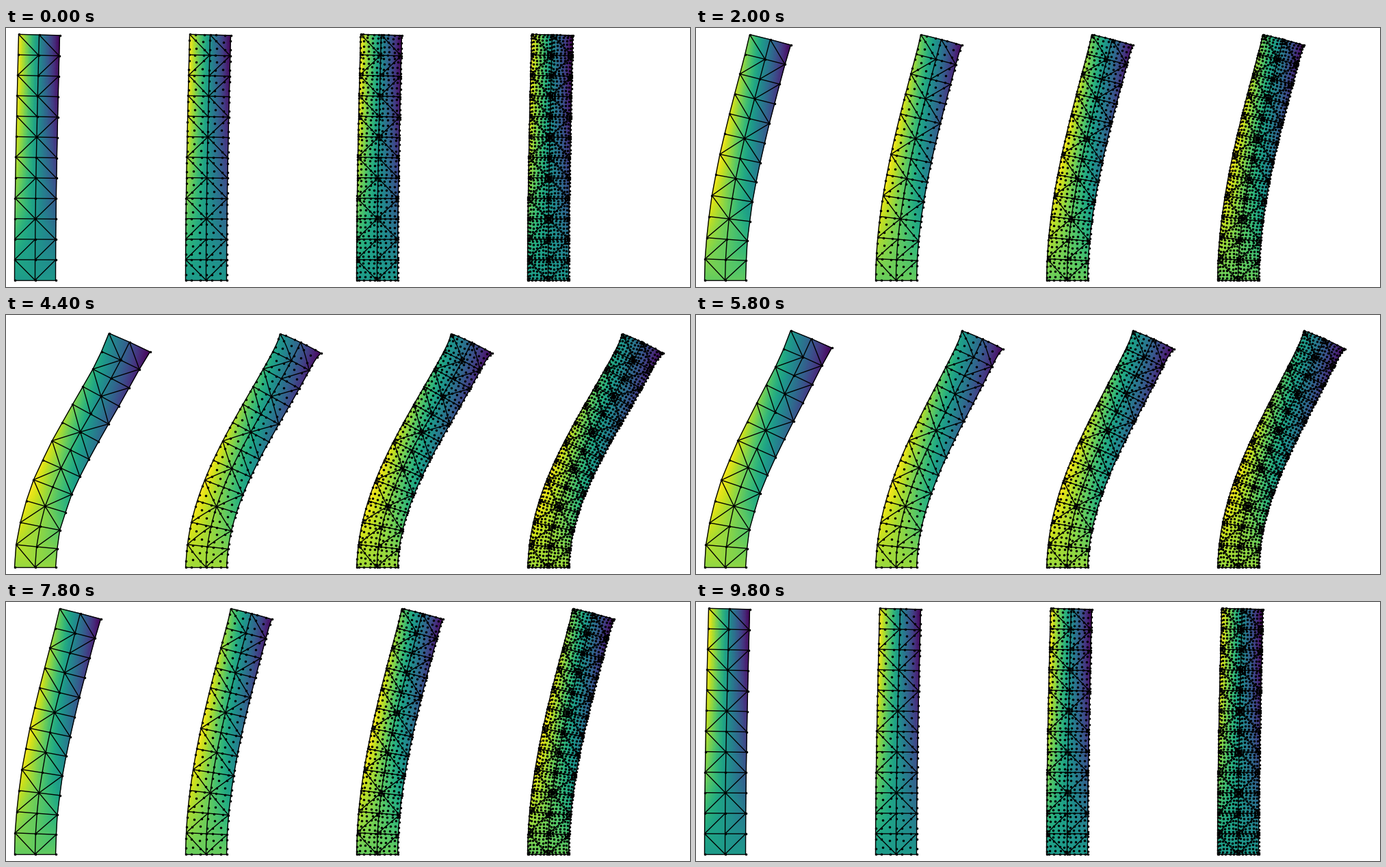
Write a matplotlib script that moves like this. It is 1000 px wide and 380 px high and loops after 10 s.

```python
import matplotlib.pyplot as plt
import numpy as np
from matplotlib.animation import FuncAnimation
from matplotlib.collections import LineCollection
from numpy.polynomial.legendre import Legendre, leggauss

W, H, DPI = 1000, 380, 100
LEFT, BOTTOM, CELL, ROWS = 12.5, 10, 30, 12
STEPS, PUSH, PITCH = 25, 6, 250
DEGREES = (1, 3, 5, 7)
DETAIL = 6  # subdivisions of a triangle side for fills and edges
MU, LAM = 1.0, 1.5

# Per column, bottom row first: 1 where the cell's diagonal rises to the right.
RISING = ("011010100010", "110100010110")


def corners():
    tris = []
    for col, column in enumerate(RISING):
        for row, rising in enumerate(column):
            x, y = LEFT + CELL * col, BOTTOM + CELL * row
            a, b = (x, y), (x + CELL, y)
            c, d = (x + CELL, y + CELL), (x, y + CELL)
            tris += [(a, b, c), (a, c, d)] if rising == "1" else [(a, b, d), (b, c, d)]
    return np.array(tris, float)


TRIS = corners()


def lattice(p, uniform=False):
    """Index pairs and reference points, by default clustered like Gauss-Lobatto nodes."""
    if uniform:
        v = np.linspace(0, 1, p + 1)
    else:
        v = (np.r_[-1, np.sort(Legendre.basis(p).deriv().roots().real), 1] + 1) / 2
    pairs = [(i, j) for i in range(p + 1) for j in range(p + 1 - i)]
    i, j = np.array(pairs).T
    k = p - i - j
    ref = np.column_stack([1 + 2 * v[i] - v[j] - v[k],
                           1 + 2 * v[j] - v[i] - v[k]]) / 3
    return pairs, ref


def place(ref):
    sides = TRIS[:, 1:] - TRIS[:, :1]
    return TRIS[:, :1] + np.einsum("nr,erj->enj", ref, sides)


def first_of(points):
    return np.unique(np.round(points, 3), axis=0, return_index=True)[1]


def basis(p, points):
    """Values and gradients of the nodal basis at reference points."""
    pairs, ref = lattice(p)
    i, j = np.array(pairs).T

    def power(t, n):
        return t[:, None] ** np.maximum(n, 0)

    inverse = np.linalg.inv(power(ref[:, 0], i) * power(ref[:, 1], j))
    a, b = points.T
    value = power(a, i) * power(b, j) @ inverse
    da = i * power(a, i - 1) * power(b, j) @ inverse
    db = j * power(a, i) * power(b, j - 1) @ inverse
    return value, np.stack([da, db], -1)


def solve(p):
    """Neo-Hookean column, clamped below, top pushed sideways step by step.

    Returns element-wise displacements for every load step."""
    xy = place(lattice(p)[1])
    nodes, conn = np.unique(np.round(xy.reshape(-1, 2), 3), axis=0, return_inverse=True)
    conn = conn.reshape(xy.shape[:2])

    t, w = leggauss(4)
    t, w = (t + 1) / 2, w / 2
    points = np.array([(s, r * (1 - s)) for s in t for r in t])
    weights = np.array([m * n * (1 - s) for s, m in zip(t, w) for n in w])
    jac = np.swapaxes(TRIS[:, 1:] - TRIS[:, :1], 1, 2)
    grad = np.einsum("qnr,erj->eqnj", basis(p, points)[1], np.linalg.inv(jac))
    weights = weights * np.linalg.det(jac)[:, None]

    size = 2 * len(nodes)
    dofs = (2 * conn[:, :, None] + np.arange(2)).reshape(len(conn), -1)
    low = np.flatnonzero(nodes[:, 1] < BOTTOM + 0.01)
    top = 2 * np.flatnonzero(nodes[:, 1] > BOTTOM + CELL * ROWS - 0.01)
    free = np.setdiff1d(np.arange(size), np.r_[2 * low, 2 * low + 1, top])
    eye = np.eye(2)
    same = np.einsum("ik,jl->ijkl", eye, eye)
    u = np.zeros(size)
    states = []
    for _ in range(STEPS):
        for iteration in range(5):
            local = u.reshape(-1, 2)[conn]
            F = eye + np.einsum("eni,eqnj->eqij", local, grad)
            G = np.swapaxes(np.linalg.inv(F), -1, -2)
            log_j = np.log(np.linalg.det(F))[..., None, None]
            P = MU * (F - G) + LAM * log_j * G
            A = (MU * same
                 + (MU - LAM * log_j)[..., None, None] * np.einsum("eqil,eqkj->eqijkl", G, G)
                 + LAM * np.einsum("eqij,eqkl->eqijkl", G, G))
            force = np.einsum("eq,eqij,eqnj->eni", weights, P, grad, optimize=True)
            stiff = np.einsum("eq,eqijkl,eqnj,eqml->enimk", weights, A, grad, grad,
                              optimize=True)
            r, K = np.zeros(size), np.zeros((size, size))
            np.add.at(r, dofs, force.reshape(dofs.shape))
            np.add.at(K, (dofs[:, :, None], dofs[:, None, :]),
                      stiff.reshape(len(conn), dofs.shape[1], -1))
            du = np.zeros(size)
            if iteration == 0:
                du[top] = PUSH
            rhs = -(r + K @ du)[free]
            du[free] = np.linalg.solve(K[np.ix_(free, free)], rhs)
            u = u + du
        states.append(u.reshape(-1, 2)[conn])
    return np.array(states)


def subdivide(n):
    """Uniform points, small triangles and side polylines over all elements."""
    pairs, ref = lattice(n, uniform=True)
    at = {pair: m for m, pair in enumerate(pairs)}
    small = [(at[i, j], at[i + 1, j], at[i, j + 1]) for i, j in pairs if i + j < n]
    small += [(at[i + 1, j], at[i + 1, j + 1], at[i, j + 1])
              for i, j in pairs if i + j < n - 1]
    span = range(n + 1)
    sides = [[at[i, 0] for i in span], [at[0, i] for i in span],
             [at[i, n - i] for i in span]]
    shift = len(pairs) * np.arange(len(TRIS))[:, None, None]
    triangles = (np.array(small) + shift).reshape(-1, 3)
    edges = (np.array(sides) + shift).reshape(-1, n + 1)
    xy = place(ref).reshape(-1, 2)
    return ref, triangles, edges[first_of(xy[edges[:, 0]] + xy[edges[:, -1]])]


FINE, TRIANGLES, EDGES = subdivide(DETAIL)


class Panel:
    def __init__(self, p, offset, solver_degree, states):
        self.offset, self.degree, self.states = offset, solver_degree, states
        nodes = lattice(p)[1]
        self.fine, self.lift = self.deform(FINE)
        self.nodes = self.deform(nodes)[0][:, first_of(place(nodes).reshape(-1, 2))]

    def deform(self, ref):
        """Positions and vertical displacements for every load step."""
        value = basis(self.degree, ref)[0]
        move = np.einsum("nm,semj->senj", value, self.states).reshape(STEPS, -1, 2)
        return place(ref).reshape(-1, 2) + (self.offset, 0) + move, move[..., 1]

    def draw(self, ax, step):
        pos = self.fine[step]
        fill = ax.tripcolor(*pos.T, TRIANGLES, self.lift[step],
                            shading="gouraud", cmap="viridis")
        lines = ax.add_collection(LineCollection(pos[EDGES], colors="k", linewidths=1))
        dots, = ax.plot(*self.nodes[step].T, "k.", ms=3)
        return [fill, lines, dots]


solutions = {q: solve(q) for q in (1, 3)}
panels = [Panel(p, PITCH * n, min(p, 3), solutions[min(p, 3)])
          for n, p in enumerate(DEGREES)]

fig = plt.figure(figsize=(W / DPI, H / DPI), dpi=DPI, facecolor="white")
ax = fig.add_axes([0, 0, 1, 1])
ax.set(xlim=(0, W), ylim=(0, H), autoscale_on=False)
ax.axis("off")
shown = []


def update(frame):
    for artist in shown:
        artist.remove()
    step = min(frame, 2 * STEPS - 1 - frame)
    shown[:] = [artist for panel in panels for artist in panel.draw(ax, step)]
    return shown


animation = FuncAnimation(fig, update, frames=2 * STEPS, interval=200, repeat=True)
plt.show()
```
